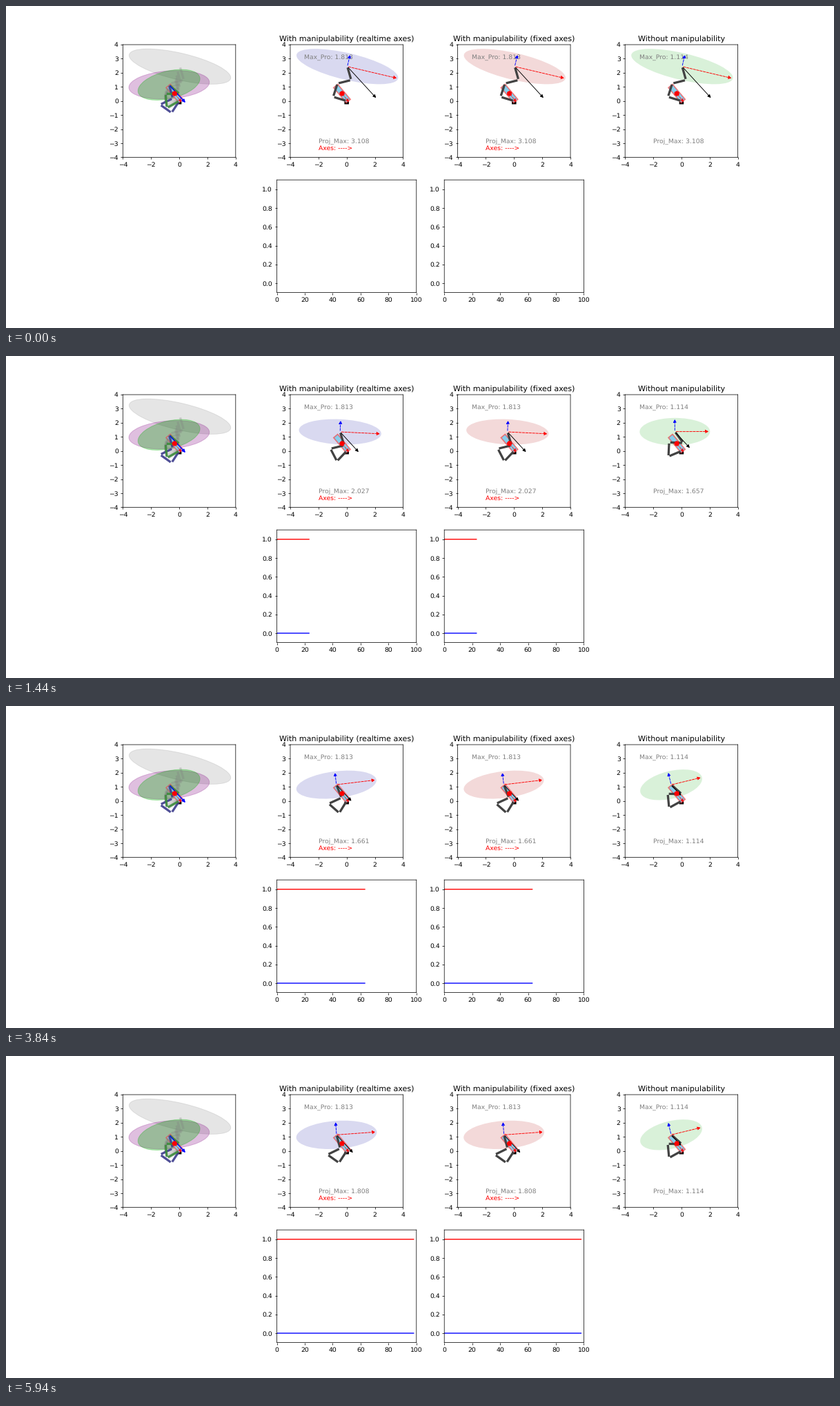
Recreate the animation shown at these times as a matplotlib script. Size 1200x467 px, loop 6 s.

```python
import numpy as np
import matplotlib.pyplot as plt
from matplotlib.animation import FuncAnimation
from matplotlib.collections import LineCollection
from matplotlib.patches import Ellipse, FancyArrowPatch, Rectangle, RegularPolygon

plt.rcParams.update({"path.snap": False, "text.hinting": "none"})

FRAMES, INTERVAL = 100, 60
KEYS = np.array([0, 16, 32, 48, 64, 88, 99])
PUSH = np.array([np.cos(np.radians(47.5)), -np.sin(np.radians(47.5))])
WORK = np.array([-0.33, 0.53])

# Absolute link angles in degrees at the key steps
START = (163, 72, 14, 106)
WITH = [START, (213, 102, 7, 104), (234, 128, 20, 110), (239, 136, 24, 114),
        (238.4, 138.5, 24.6, 111.4), (237.5, 142.5, 25.5, 107), (237, 144.5, 26, 105)]
WITHOUT = [START, (200.4, 83.6, 2, 120), (204.4, 90.2, -4, 132)] + [(209, 95.7, -1, 139)] * 4
PROJ_WITH = [3.108, 2.329, 1.813, 1.6, 1.661, 1.76, 1.808]
PROJ_WITHOUT = [3.108, 2.024, 1.399] + [1.114] * 4


def warp(n):
    """Fast approach followed by a slow steady drift."""
    return 1 - np.exp(-np.asarray(n) / 16) + np.asarray(n) / 100


def smooth(values):
    """Monotone cubic through the key values, sampled at every step."""
    x, y = warp(KEYS), np.asarray(values, float)
    h, sec = np.diff(x), np.diff(y) / np.diff(x)
    a, b = sec[:-1], sec[1:]
    same = a * b > 0
    inner = np.where(same, 2 * a * b / np.where(same, a + b, 1), 0)
    m = np.concatenate([sec[:1], inner, sec[-1:]])
    s = warp(np.arange(FRAMES))
    i = np.clip(np.searchsorted(x, s, side="right") - 1, 0, len(h) - 1)
    t = (s - x[i]) / h[i]
    return (y[i] * (1 + 2 * t) * (1 - t) ** 2 + y[i + 1] * t * t * (3 - 2 * t)
            + h[i] * m[i] * t * (1 - t) ** 2 + h[i] * m[i + 1] * t * t * (t - 1))


def track(poses):
    return np.radians(np.column_stack([smooth(c) for c in zip(*poses)]))


def joints(angles):
    steps = np.column_stack([np.cos(angles), np.sin(angles)])
    return np.vstack([[0, 0], np.cumsum(steps, axis=0)])


def links(pts):
    a, b = pts[:-1], pts[1:]
    return np.stack([a + 0.08 * (b - a), b - 0.08 * (b - a)], axis=1)


def main_axes(pts):
    """Half axes of the manipulability ellipse at the tip."""
    r = pts[-1] - pts[:-1]
    jac = np.stack([-r[:, 1], r[:, 0]])
    w, v = np.linalg.eigh(jac @ jac.T)
    major, minor = v[:, 1] * np.sqrt(w[1]), v[:, 0] * np.sqrt(w[0])
    return major * np.sign(major[0]), minor * np.sign(minor[1])


def shape_ellipse(patch, pts):
    major, minor = main_axes(pts)
    patch.set_center(pts[-1])
    patch.width, patch.height = 2 * np.hypot(*major), 2 * np.hypot(*minor)
    patch.angle = np.degrees(np.arctan2(major[1], major[0]))
    return major, minor


def add_ellipse(ax, **style):
    return ax.add_patch(Ellipse((0, 0), 1, 1, zorder=1, **style))


def add_arrow(ax, color, lw=1.0, ls="-", zorder=4):
    return ax.add_patch(FancyArrowPatch(
        (0, 0), (1, 1), arrowstyle="-|>", mutation_scale=10, shrinkA=2, shrinkB=2,
        color=color, lw=lw, linestyle=ls, zorder=zorder))


def add_arm(ax, color, alpha=1.0, pts=None):
    segs = [] if pts is None else links(pts)
    arm = LineCollection(segs, colors=color, linewidths=3.5, alpha=alpha, zorder=3)
    ax.add_collection(arm, autolim=False)
    return arm


def add_scene(ax):
    """Frame, base, workpiece and the turning head; returns the head."""
    ax.set(xlim=(-4, 4), ylim=(-4, 4), aspect="equal",
           xticks=range(-4, 5, 2), yticks=range(-4, 5))
    ax.add_patch(Rectangle((-0.16, -0.23), 0.32, 0.19, color="black", lw=0, zorder=2))
    size = np.array([1.4, 0.38])
    ax.add_patch(Rectangle(WORK - size / 2, *size, angle=-50, rotation_point="center",
                           fc="skyblue", ec=(1, 0.2, 0.2, 0.6), lw=1.8, zorder=2))
    tip = add_arrow(ax, "red", ls="--", zorder=3.5)
    tip.set_positions(WORK, (0.22, -0.15))
    tip.set_alpha(0.8)
    return ax.add_patch(RegularPolygon(WORK, 6, radius=0.185, color="red", lw=0.4, zorder=5))


class Panel:
    def __init__(self, ax, title, tint, poses, proj, best, note):
        self.head = add_scene(ax)
        ax.set_title(title)
        self.poses, self.proj = poses, proj
        self.ellipse = add_ellipse(ax, fc=tint, ec="none")
        self.arm = add_arm(ax, "#424242")
        self.major = add_arrow(ax, "red", ls="--")
        self.minor = add_arrow(ax, "blue", ls="--")
        self.push = add_arrow(ax, "black")
        ax.text(-3, 3, f"Max_Pro: {best}", color="gray")
        self.label = ax.text(-2, -3, "", color="gray")
        if note:
            ax.text(-2, -3.5, "Axes: ---->", color="red")

    def update(self, n):
        pts = joints(self.poses[n])
        tip = pts[-1]
        major, minor = shape_ellipse(self.ellipse, pts)
        self.arm.set_segments(links(pts))
        self.major.set_positions(tip, tip + major)
        self.minor.set_positions(tip, tip + minor)
        self.push.set_positions(tip, tip + self.proj[n] * PUSH)
        self.label.set_text(f"Proj_Max: {round(float(self.proj[n]), 3)}")


with_poses, without_poses = track(WITH), track(WITHOUT)
with_proj, without_proj = smooth(PROJ_WITH), smooth(PROJ_WITHOUT)

fig, axs = plt.subplots(2, 4, figsize=(18, 7.005), dpi=200 / 3)

# Overview: trail from the first pose to the last ones
over = axs[0, 0]
heads = [add_scene(over)]
first, last = joints(with_poses[0]), joints(with_poses[-1])
last_plain = joints(without_poses[-1])
for color, alpha, pts in (("gray", 0.2, first), ("purple", 0.25, last),
                          ("#00b000", 0.3, last_plain)):
    shape_ellipse(add_ellipse(over, color=color, alpha=alpha), pts)
for n in range(0, 17, 4):
    add_arm(over, "gray", 0.3, joints(with_poses[n]))
add_arm(over, "#3c3c8c", 0.9, last)
add_arm(over, "#3c8c3c", 0.9, last_plain)
add_arrow(over, "blue", lw=1.5).set_positions(last[-1], last[-1] + with_proj[-1] * PUSH)

panels = [
    Panel(axs[0, 1], "With manipulability (realtime axes)", "#d9d9f0",
          with_poses, with_proj, 1.813, True),
    Panel(axs[0, 2], "With manipulability (fixed axes)", "#f3d9d9",
          with_poses, with_proj, 1.813, True),
    Panel(axs[0, 3], "Without manipulability", "#d9f1d9",
          without_poses, without_proj, 1.114, False),
]
heads += [p.head for p in panels]

# Weight history
traces = []
for ax in axs[1, 1:3]:
    ax.set(xlim=(0, 100), ylim=(-0.1, 1.1))
    traces += [(ax.plot([], [], color=c, lw=1.5)[0], y) for c, y in (("red", 1), ("blue", 0))]
for ax in axs[1, ::3]:
    ax.axis("off")


def update(n):
    for p in panels:
        p.update(n)
    for head in heads:
        head.orientation = 0.1 * n
        head.stale = True
    for line, y in traces:
        line.set_data(np.arange(n), np.full(n, y))
    return []


anim = FuncAnimation(fig, update, frames=FRAMES, interval=INTERVAL,
                     init_func=lambda: update(0), repeat=True, repeat_delay=0)
plt.show()
```
